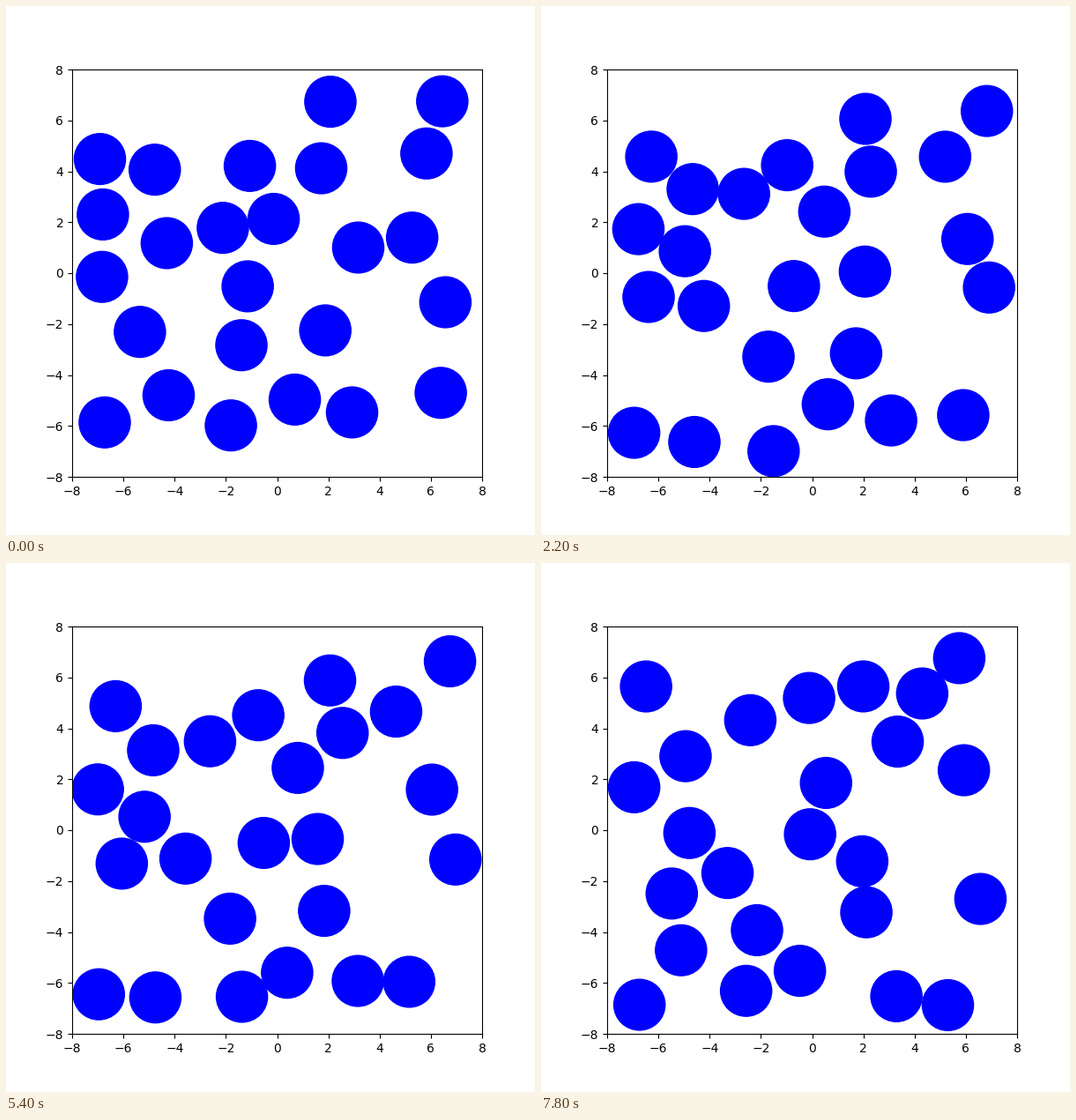
Write a matplotlib script that moves like this. It is 600 px wide and 600 px high and loops after 8000 ms.

```python
import numpy as np
import matplotlib.pyplot as plt
from matplotlib.animation import FuncAnimation
from matplotlib.patches import Circle

# Elastic hard discs in a square box. One known state is run forwards and,
# since the motion is reversible, backwards.
RADIUS, WALL = 1, 8
START, END = 59, 129.5

# x, y in pixels and velocity in pixels per clock unit, at START
STATE = np.array([
    (126.0, 169.5, -.097, -.418), (171.3, 208.1, -.255, .255),
    (280.4, 178.9, .336, -.366), (375.9, 188.3, .312, .072),
    (368.0, 130.2, .001, .367), (509.0, 117.1, .546, -.33),
    (454.2, 170.3, -.691, -.104), (109.8, 254.6, -.16, .23),
    (161.7, 282.4, -.2, .735), (229.5, 209.8, .112, -.447),
    (323.9, 233.0, .416, -.035), (363.8, 304.3, -.605, .514),
    (484.3, 264.0, -.066, -.411), (124.6, 332.6, .43, .43),
    (188.4, 336.9, .619, -.555), (288.3, 317.6, .24, -.006),
    (508.5, 322.1, .212, .836), (257.0, 399.2, -.17, .245),
    (358.3, 394.1, .152, .026), (104.9, 485.4, -.12, .222),
    (172.8, 500.5, -.198, 1.0), (264.8, 501.5, .165, -.56),
    (323.7, 455.1, -.283, .565), (397.6, 471.1, .086, .172),
    (473.3, 466.9, -.94, .477),
])
SCALE = np.array([29.0625, -28.875])
POS = (STATE[:, :2] - (307.5, 303)) / SCALE
VEL = STATE[:, 2:] / SCALE
A, B = np.triu_indices(len(POS), 1)

# (frame, clock) pairs; the frames between them stop at the collisions
KEYS = [(0, 0), (5, 24.5), (11, 53), (18, 62.5), (27, 76), (35, 109), (39, END)]


def pair_times(pos, vel):
    """Time until each pair touches, infinite if it never does."""
    d, w = pos[A] - pos[B], vel[A] - vel[B]
    a, b = (w * w).sum(1), (d * w).sum(1)
    c = (d * d).sum(1) - (2 * RADIUS) ** 2
    root = b * b - a * c
    hit = (b < 0) & (root > 0)
    t = np.full(len(A), np.inf)
    t[hit] = np.maximum((-b[hit] - np.sqrt(root[hit])) / a[hit], 0)
    return t


def wall_times(pos, vel):
    return np.maximum((np.copysign(WALL - RADIUS, vel) - pos) / vel, 0)


def run(pos, vel, span):
    """Return the times and positions at the start, every collision and the end."""
    t, vel = 0, vel.copy()
    times, track = [t], [pos]
    while True:
        pairs, walls = pair_times(pos, vel), wall_times(pos, vel)
        dt = min(pairs.min(), walls.min(), span - t)
        t, pos = t + dt, pos + vel * dt
        times.append(t)
        track.append(pos)
        if t >= span - 1e-9:
            return np.array(times), np.array(track)
        if pairs.min() < walls.min():
            k = pairs.argmin()
            i, j = A[k], B[k]
            n = pos[i] - pos[j]
            n = n / np.hypot(*n)
            push = n * ((vel[j] - vel[i]) @ n)
            vel[i] += push
            vel[j] -= push
        else:
            vel[np.unravel_index(walls.argmin(), walls.shape)] *= -1


def frame_clock(hits):
    clock = []
    for (f0, t0), (f1, t1) in zip(KEYS, KEYS[1:]):
        stops = [t0, *hits[(hits > t0 + .5) & (hits < t1 - .5)], t1]
        steps = np.linspace(0, len(stops) - 1, f1 - f0 + 1)
        clock.extend(np.interp(steps, range(len(stops)), stops)[:-1])
    return clock + [END]


back_t, back = run(POS, -VEL, START)
fore_t, fore = run(POS, VEL, END - START)
times = np.concatenate([START - back_t[:0:-1], START + fore_t])
track = np.concatenate([back[:0:-1], fore]).reshape(len(times), -1)
clock = frame_clock(times[times != START])
frames = np.array([np.interp(clock, times, q) for q in track.T]).T
frames = frames.reshape(len(clock), -1, 2)

fig, ax = plt.subplots(figsize=(6, 6), dpi=100)
ax.set_xlim(-WALL, WALL)
ax.set_ylim(-WALL, WALL)
discs = [ax.add_patch(Circle(p, RADIUS, color="blue")) for p in frames[0]]


def draw(i):
    for disc, p in zip(discs, frames[i]):
        disc.center = p
    return discs


anim = FuncAnimation(fig, draw, frames=len(frames), interval=200,
                     repeat=True, repeat_delay=0)
plt.show()
```
